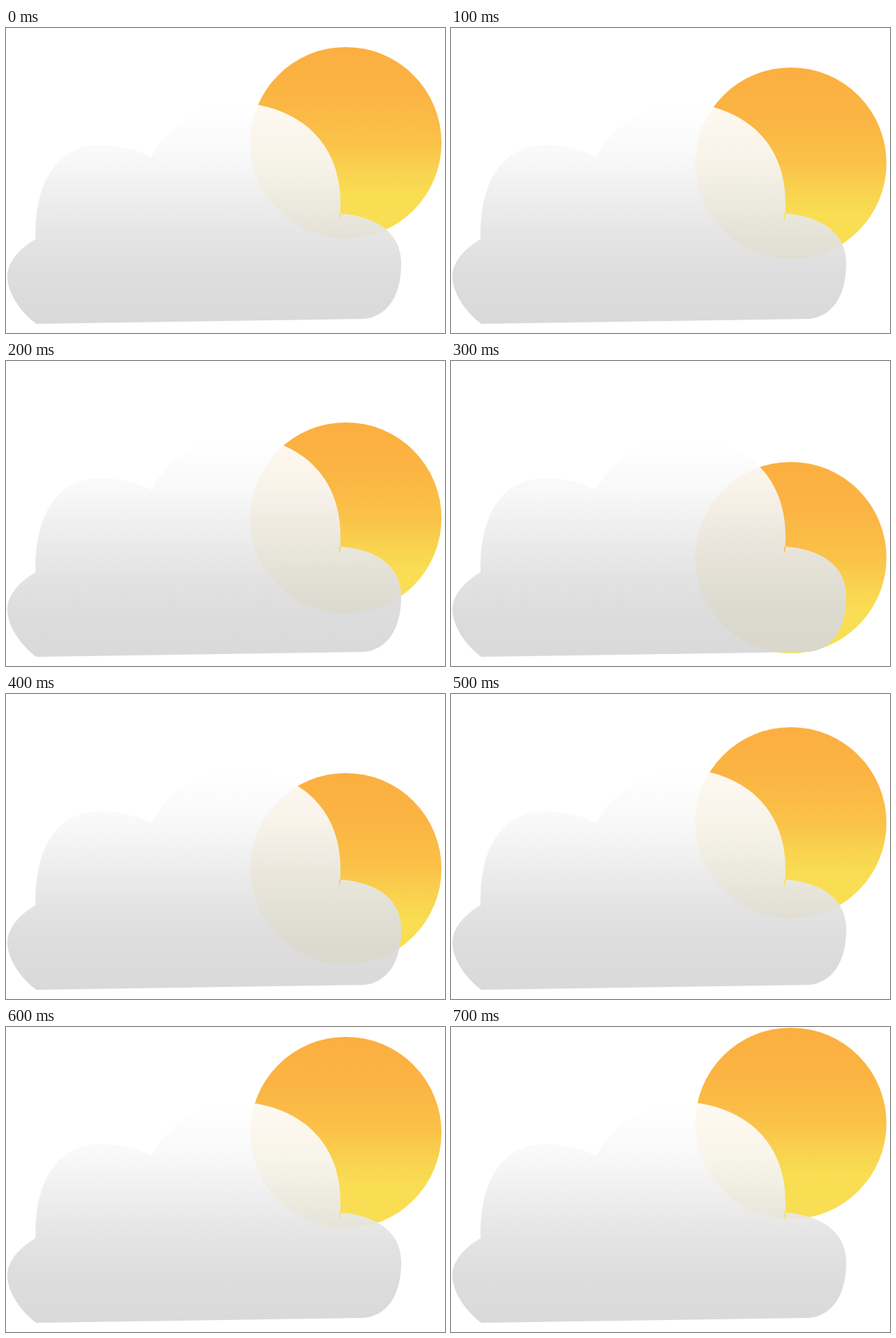
Animation, 622 px wide and 432 px high, one loop 0.9 s. Source, as an HTML page with a canvas:

```html
<!DOCTYPE html>
<html lang="en">
<head>
<meta charset="utf-8">
<title>Sun and cloud</title>
<style>
  html, body { margin: 0; width: 100%; height: 100%; overflow: hidden; background: #fff; }
  canvas { display: block; }
</style>
</head>
<body>
<canvas id="stage" width="622" height="432"></canvas>
<script>
const ctx = document.getElementById('stage').getContext('2d');
const STEP = 100;
const sunTops = [27, 56, 87, 143, 112, 47, 14, 1, 1];
const radius = 135.5;

const cloud = new Path2D(`
  M43 419
  C20 402 2 375 2 352
  C2 332 18 313 42 299
  C40 215 75 166 133 166
  C160 166 182 172 206 182
  C235 128 290 105 335 106
  C424 113 476 170 474 252
  L473.5 263 L472 263.5 L472 272 L473.2 271 L474 263
  C524 266 560 290 560 333
  C560 380 540 409 507 412
  Z`);

function gradient(y0, y1, stops) {
  const g = ctx.createLinearGradient(0, y0, 0, y1);
  for (const [at, color] of stops) g.addColorStop(at, color);
  return g;
}

const cloudFill = gradient(110, 419, [
  [0, '#ffffff'], [0.23, '#f8f8f8'], [0.48, '#e9e9e9'],
  [0.62, '#e1e1e1'], [0.78, '#dadada'], [1, '#d6d6d6']
]);
const sunFill = gradient(0, radius * 2, [
  [0, '#fbaf40'], [0.25, '#fbb443'], [0.5, '#fac248'],
  [0.64, '#f9d24f'], [0.78, '#f9de53'], [1, '#f9de53']
]);

function drawSun(top) {
  ctx.save();
  ctx.translate(481.5, top);
  ctx.fillStyle = sunFill;
  ctx.beginPath();
  ctx.arc(0, radius, radius, 0, Math.PI * 2);
  ctx.fill();
  ctx.restore();
}

function drawCloud() {
  ctx.globalAlpha = 0.92;
  ctx.fillStyle = cloudFill;
  ctx.fill(cloud);
  ctx.globalAlpha = 1;
}

function render(now) {
  const step = Math.floor(Math.max(0, now) / STEP) % sunTops.length;
  ctx.fillStyle = '#fff';
  ctx.fillRect(0, 0, 622, 432);
  drawSun(sunTops[step]);
  drawCloud();
}

const start = performance.now();
function loop() {
  render(performance.now() - start);
  requestAnimationFrame(loop);
}
loop();
</script>
</body>
</html>
```
